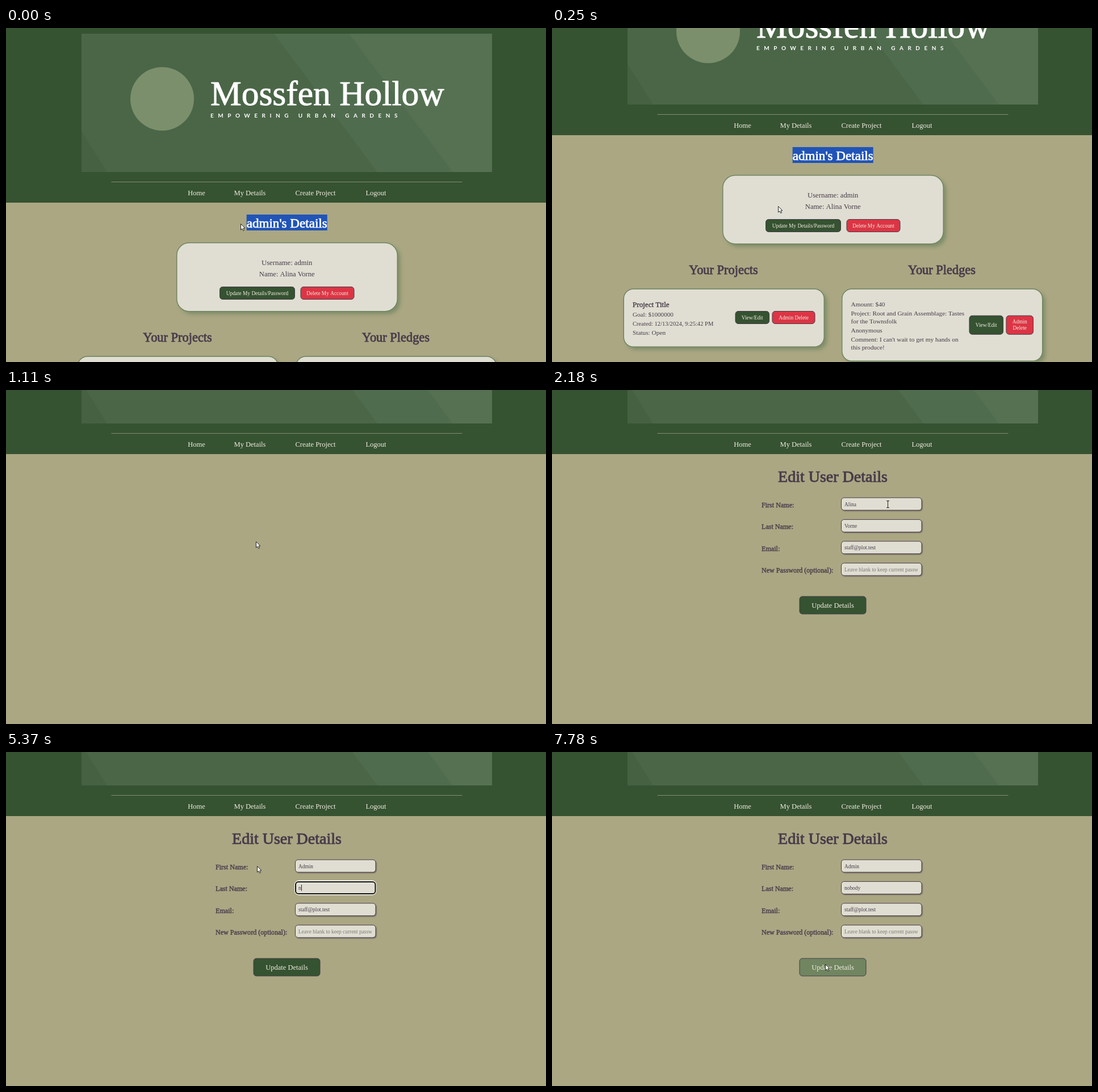
Animation, 951 px wide and 589 px high, one loop 8 s. Source, as an HTML page with a canvas:

```html
<!DOCTYPE html>
<html lang="en">
<head>
<meta charset="utf-8">
<title>Garden account</title>
<style>
  html, body { margin: 0; width: 100%; height: 100%; overflow: hidden; background: #aba783; }
  canvas { display: block; width: 951px; height: 589px; }
</style>
</head>
<body>
<canvas id="stage" width="951" height="589"></canvas>
<script>
const ctx = document.getElementById('stage').getContext('2d');
const LOOP = 8000;
const SERIF = '"Liberation Serif", "Times New Roman", serif';
const C = {
  head: '#355231', body: '#aba783', card: '#e0ded2', sage: '#708560', ink: '#463b49',
  cream: '#f1ecdf', red: '#dc3545', select: '#2054b8', mark: '#7c8f6c', hint: '#7b7a75'
};

// Stepped tracks: each entry holds until the next one.
const SCROLL = [[0, 0], [120, 44], [250, 119], [390, 195]];
const POINTER = [
  [0, 413, 345], [120, 406, 329], [250, 398, 314], [390, 406, 311], [510, 417, 299],
  [640, 430, 281], [760, 438, 270], [880, 440, 267], [1790, 453, 273], [1910, 464, 267],
  [2060, 541, 222], [2180, 591, 201], [2700, 566, 201], [2820, 530, 201], [2950, 490, 201],
  [3080, 442, 201], [6780, 443, 213], [6900, 448, 248], [7030, 457, 294], [7150, 467, 336],
  [7260, 476, 365], [7380, 481, 374]
];
const FIRST_KEYS = [4050, 4170, 4290, 4440, 4560];
const LAST_KEYS = [5370, 5490, 5610, 5730, 5880, 6000];
const T = { blank: 1110, form: 1420, focus: 2430, drag: 2700, dragEnd: 3080, next: 4560, press: 7530 };

const at = (track, t) => track.filter(k => k[0] <= t).pop();

function font(size, family = SERIF, weight = 'normal') {
  ctx.font = `${weight} ${size}px ${family}`;
}

function text(str, x, y, size, color = C.ink, align = 'left', heavy = 0) {
  font(size);
  ctx.textAlign = align;
  ctx.fillStyle = ctx.strokeStyle = color;
  ctx.fillText(str, x, y);
  if (heavy) {
    ctx.lineWidth = heavy;
    ctx.lineJoin = 'round';
    ctx.strokeText(str, x, y);
  }
}

function rect(x, y, w, h, color) {
  ctx.fillStyle = color;
  ctx.fillRect(x, y, w, h);
}

function poly(points, fill) {
  ctx.beginPath();
  points.forEach(([x, y]) => ctx.lineTo(x, y));
  ctx.closePath();
  ctx.fillStyle = fill;
  ctx.fill();
}

function box(x, y, w, h, r, fill, stroke, line = 1, shadow) {
  ctx.beginPath();
  ctx.roundRect(x + line / 2, y + line / 2, w - line, h - line, r);
  ctx.fillStyle = fill;
  ctx.save();
  if (shadow) {
    ctx.shadowColor = shadow.color;
    ctx.shadowBlur = shadow.blur;
    ctx.shadowOffsetX = ctx.shadowOffsetY = shadow.offset;
  }
  ctx.fill();
  ctx.restore();
  ctx.strokeStyle = stroke;
  ctx.lineWidth = line;
  ctx.stroke();
}

function card(x, y, w, h, r) {
  box(x, y, w, h, r, C.card, C.sage, 1.5, { color: 'rgba(112,133,96,.75)', blur: 6, offset: 5 });
}

function button(label, x, y, w, h, fill, size = 9.35) {
  box(x, y, w, h, 5, fill, C.ink);
  const lines = label.split('\n');
  lines.forEach((s, i) => {
    const mid = y + h / 2 + (i - (lines.length - 1) / 2) * 11;
    text(s, x + w / 2, mid + size * 0.33, size, C.cream, 'center');
  });
}

function banner() {
  ctx.save();
  ctx.beginPath();
  ctx.rect(133, 10, 723, 244);
  ctx.clip();
  rect(133, 10, 723, 244, '#4a6647');
  poly([[133, 182], [178, 254], [133, 254]], '#456142');
  poly([[472, 10], [856, 10], [856, 254], [654, 254]], '#506c4e');
  poly([[604, 10], [856, 10], [856, 254], [787, 254]], '#557152');
  ctx.restore();
  ctx.beginPath();
  ctx.arc(275, 125, 56, 0, Math.PI * 2);
  ctx.fillStyle = C.mark;
  ctx.fill();
  text('Mossfen Hollow', 360, 136, 61.5, '#fff', 'left', 1);
  font(10, 'Lato, sans-serif', 'bold');
  ctx.letterSpacing = '7.5px';
  ctx.fillText('EMPOWERING URBAN GARDENS', 360, 158);
  ctx.letterSpacing = '0px';
}

function header() {
  rect(0, 0, 951, 308, C.head);
  banner();
  rect(185.5, 271, 618, 1, '#7f9070');
  [['Home', 335.5], ['My Details', 429.5], ['Create Project', 545], ['Logout', 651.5]]
    .forEach(([s, x]) => text(s, x, 295, 12.5, C.cream, 'center'));
}

function pledge(y, amount, comment, h) {
  card(510, y, 354.5, h, 17);
  const lines = [`Amount: $${amount}`, 'Project: Root and Grain Assemblage: Tastes',
    'for the Townsfolk', 'Anonymous', ...comment];
  [31, 47, 61, 77, 93, 107].forEach((dy, i) => text(lines[i] || '', 526.5, y + dy, 11.3));
  const top = y + h / 2 - 17;
  button('View/Edit', 734.5, top, 60.5, 34, C.head);
  button('Admin\nDelete', 799.5, top, 48.5, 34, C.red);
}

function details(pointer, scroll) {
  font(23.1);
  const half = ctx.measureText("admin's Details").width / 2;
  rect(494.7 - half, 329, half * 2, 28, C.select);
  text("admin's Details", 494.7, 352, 23.1, '#fff', 'center', 0.7);

  card(300, 378, 390, 122.5, 22);
  text('Username: admin', 494.7, 417.5, 12.6, C.ink, 'center');
  text('Name: Alina Vorne', 494.7, 437.5, 12.6, C.ink, 'center');
  const y = pointer[2] + scroll;
  const over = pointer[1] >= 376 && pointer[1] < 508 && y >= 456 && y < 479;
  button('Update My Details/Password', 376, 456, 133, 23, over ? C.sage : C.head);
  button('Delete My Account', 518.5, 456, 95, 23, C.red);

  text('Your Projects', 302, 553, 22.4, C.ink, 'center', 0.8);
  text('Your Pledges', 686.5, 553, 22.4, C.ink, 'center', 0.8);

  card(125.5, 578.5, 354.5, 103.5, 17);
  text('Project Title', 142, 610.5, 13.1, C.ink, 'left', 0.4);
  text('Goal: $1000000', 142, 628, 11.1);
  text('Created: 12/13/2024, 9:25:42 PM', 142, 644, 10.6);
  text('Status: Open', 142, 660, 11.3);
  button('View/Edit', 322.5, 618, 60.5, 23, C.head);
  button('Admin Delete', 387.5, 618, 76, 23, C.red);

  pledge(578.5, 40, ["Comment: I can't wait to get my hands on", 'this produce!'], 128.5);
  pledge(726.5, 10, ['Comment: Good luck!'], 114.5);
}

function typed(word, old, keys, t) {
  const n = keys.filter(k => k <= t).length;
  return n ? word.slice(0, n) : old;
}

function field(i, label, value, color, state) {
  const y = 189.5 + i * 38.4, x = 515, base = y + 15;
  text(label, 369, y + 17.5, 12.1, C.ink, 'left', 0.4);
  if (state.focus) box(508, y - 1.5, 144.5, 26, 7, '#fff', '#fff');
  box(509, y, 142.5, 23, 5, C.card, state.focus ? '#111' : C.ink, state.focus ? 2 : 1,
    state.focus ? null : { color: 'rgba(70,59,73,.65)', blur: 2, offset: 1.5 });

  ctx.save();
  ctx.beginPath();
  ctx.rect(x, y, 130, 23);
  ctx.clip();
  text(value, x, base, 9.4, color);
  const end = ctx.measureText(value).width;
  if (state.from < value.length) {
    const start = ctx.measureText(value.slice(0, state.from)).width;
    rect(x + start, y + 5, end - start, 13, C.select);
    text(value.slice(state.from), x + start, base, 9.4, '#fff');
  } else if (state.caret) {
    rect(Math.round(x + end), y + 6, 1, 11, '#222');
  }
  ctx.restore();
}

// Index of the character boundary nearest to the pointer.
function charAt(value, px) {
  font(9.4);
  let i = value.length;
  while (i && px < 513 + ctx.measureText(value.slice(0, i)).width) i--;
  return i;
}

function form(t, pointer) {
  text('Edit User Details', 494.5, 162, 28, C.ink, 'center', 0.9);
  const first = typed('Admin', 'Alina', FIRST_KEYS, t);
  const last = typed('nobody', 'Vorne', LAST_KEYS, t);
  const onFirst = t >= T.focus && t < T.next;
  const onLast = t >= T.next && t < T.press;
  const dragging = t >= T.drag && t < FIRST_KEYS[0];
  const edit = [T.focus, ...FIRST_KEYS, ...LAST_KEYS].filter(k => k <= t).pop();
  const caret = (t - edit) % 1030 < 530;
  const idle = { from: Infinity };

  field(0, 'First Name:', first, C.ink,
    { focus: onFirst, caret: onFirst && caret, from: dragging ? charAt(first, pointer[1]) : Infinity });
  field(1, 'Last Name:', last, C.ink,
    { focus: onLast, caret: onLast && caret, from: onLast && t < LAST_KEYS[0] ? 0 : Infinity });
  field(2, 'Email:', 'staff@plot.test', C.ink, idle);
  field(3, 'New Password (optional):', 'Leave blank to keep current password', C.hint, idle);

  const over = pointer[2] >= 364 && pointer[1] >= 436;
  button('Update Details', 435.5, 363.5, 118, 32, over ? C.sage : C.head, 12.5);
}

function arrow(x, y) {
  ctx.save();
  ctx.translate(x + 0.5, y + 0.5);
  poly([[0, 0], [0, 10.5], [2.5, 8.3], [4.2, 12], [6, 11.2], [4.4, 7.6], [7.4, 7.4]], '#fff');
  ctx.strokeStyle = '#111';
  ctx.lineWidth = 0.9;
  ctx.stroke();
  ctx.restore();
}

function beam(x, y) {
  rect(x, y - 5, 1, 11, '#222');
  rect(x - 2, y - 6, 5, 1, '#222');
  rect(x - 2, y + 6, 5, 1, '#222');
}

function draw(t) {
  const scroll = at(SCROLL, t)[1];
  const pointer = at(POINTER, t);
  rect(0, 0, 951, 589, C.body);
  ctx.save();
  ctx.translate(0, -scroll);
  header();
  if (t < T.blank) details(pointer, scroll);
  ctx.restore();
  if (t >= T.form) form(t, pointer);
  const cursor = t >= 2180 && t < T.dragEnd ? beam : arrow;
  cursor(pointer[1], pointer[2]);
}

function tick() {
  draw(performance.now() % LOOP);
  requestAnimationFrame(tick);
}
tick();
</script>
</body>
</html>
```
